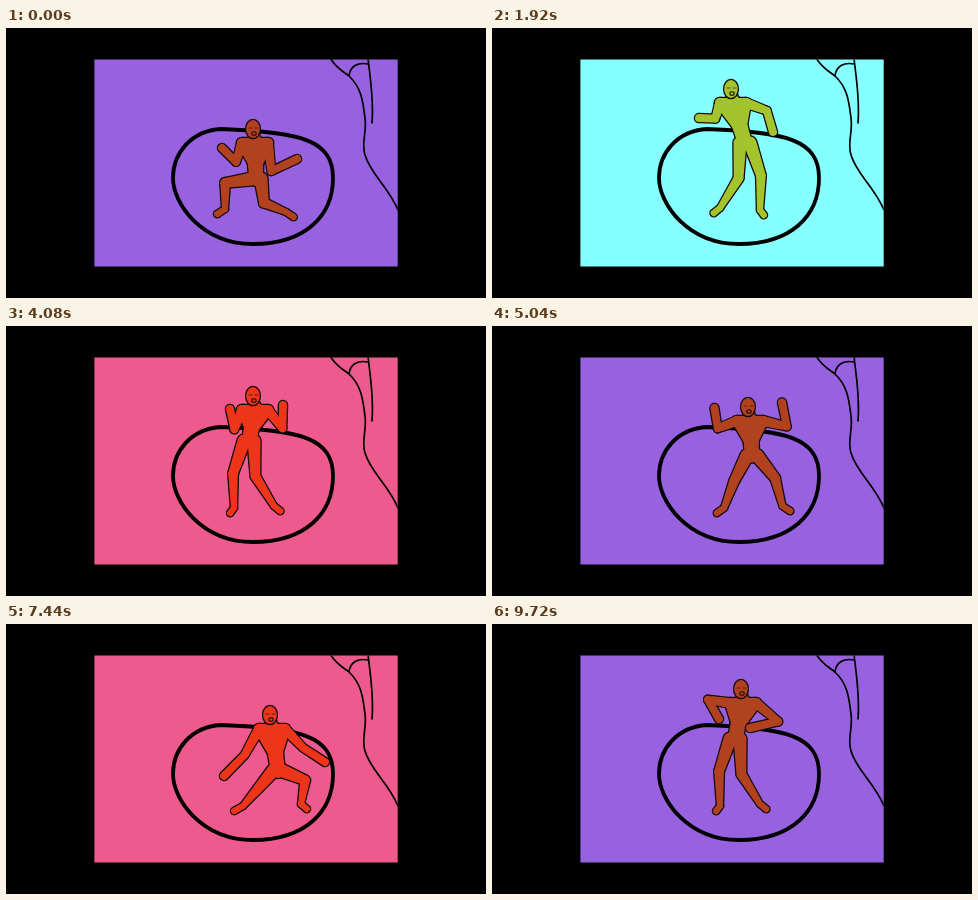
An HTML page with a canvas that plays this animation: 480 by 270 pixels, repeating every 9.84 s.

```html
<!DOCTYPE html>
<html lang="en">
<head>
<meta charset="utf-8">
<title>Dancer</title>
<style>
  html, body { margin: 0; width: 100%; height: 100%; overflow: hidden; background: #000; }
  canvas { display: block; width: 480px; height: 270px; filter: blur(.5px); }
</style>
</head>
<body>
<canvas id="stage" width="480" height="270"></canvas>
<script>
const ctx = document.getElementById('stage').getContext('2d');
const STEP = 120, STEPS = 82, BEAT = 4, INK = '#140a10';

// Backdrop and skin, in the order they flash
const palettes = [
  ['#9761e0', '#b2421f'],
  ['#85ffff', '#a3c42d'],
  ['#ee5a8e', '#ec3519'],
  ['#f0fe90', '#f4a72a']
];

// Legs: hips, left foot, right foot, bend of each knee
const squat  = [250, 151, 219, 181, 280, 184, -17, -12];
const lean   = [253, 115, 228, 180, 268, 182, 9, 6];
const lunge  = [277, 144, 236, 182, 313, 180, 3, 21];
const stride = [272, 147, 237, 182, 295, 180, 0, 15];
const mirror = ([hx, hy, lx, ly, rx, ry, bl, br], axis = 248) =>
  [2 * axis - hx, hy, 2 * axis - rx, ry, 2 * axis - lx, ly, -br, -bl];

// Upper body: head, left hand, right hand, bend of each elbow
const keys = [
  { at: 0,  body: [247, 101, 216, 120, 291, 131, 17, -23], legs: squat },
  { at: 16, body: [239, 61, 207, 90, 281, 104, 10, 10],    legs: lean },
  { at: 34, body: [247, 70, 224, 83, 277, 79, 20, -22],    legs: mirror(lean) },
  { at: 50, body: [265, 92, 221, 81, 303, 74, 12, -19],    legs: lunge },
  { at: 62, body: [264, 91, 218, 152, 319, 138, 4, -3],    legs: stride },
  { at: 70, body: [238, 59, 254, 91, 277, 103, -13, 9],    legs: lean },
  { at: 81, body: [249, 65, 227, 95, 258, 104, -20, 26],   legs: mirror(lean) }
];

const loop = new Path2D(`M215 101 C185 103 167 125 167 150 S195 216 247 216
  S327 188 327 150 S295 104 215 101Z`);
const lines = new Path2D(`M324 30 C331 41 338 44 343 48 C356 60 357 75 359 90
  C361 105 355 115 359 127 C365 147 382 158 392 182
  M343 48 C344 38 352 34 362 36 M362 30 C364 50 368 70 366 95`);

const lerp = (a, b, k) => a.map((v, i) => v + (b[i] - v) * k);
const add = ([x, y], dx, dy) => [x + dx, y + dy];

// Ease from key to key, swaying on the beat in between
function poseAt(step) {
  const i = keys.findLastIndex(k => k.at <= step);
  const from = keys[i], to = keys[i + 1] || { ...keys[0], at: STEPS };
  const span = to.at - from.at, u = (step - from.at) / span;
  const ease = u * u * (3 - 2 * u);
  const sway = Math.sin(Math.PI * Math.round(span / BEAT) * u);
  const [hx, hy, lx, ly, rx, ry, elbowL, elbowR] = lerp(from.body, to.body, ease);
  const [px, py, flx, fly, frx, fry, kneeL, kneeR] = lerp(from.legs, to.legs, ease);
  return {
    head: [hx + 5 * sway, hy], hips: [px - 4 * sway, py],
    hands: [[lx, ly + 8 * sway], [rx, ry - 8 * sway]], elbows: [elbowL, elbowR],
    feet: [[flx, fly], [frx, fry]], knees: [kneeL, kneeR]
  };
}

// Joint between two points, pushed sideways by the bend
function joint(p, q, bend) {
  const dx = q[0] - p[0], dy = q[1] - p[1], k = bend / (Math.hypot(dx, dy) || 1);
  return add(lerp(p, q, .5), dy * k, -dx * k);
}

// Tapered limb between two round joints
function limb(p, q, r, s) {
  const dx = q[0] - p[0], dy = q[1] - p[1];
  const a = Math.atan2(dy, dx);
  const b = Math.acos(Math.max(-1, Math.min(1, (r - s) / (Math.hypot(dx, dy) || 1))));
  const path = new Path2D();
  path.arc(...p, r, a + b, a - b + 2 * Math.PI);
  path.arc(...q, s, a - b, a + b);
  path.closePath();
  return path;
}

function oval(x, y, rx, ry) {
  const path = new Path2D();
  path.ellipse(x, y, rx, ry, 0, 0, 2 * Math.PI);
  return path;
}

// Shapes merge into one silhouette with a single outline
function silhouette(shapes, skin) {
  ctx.strokeStyle = INK;
  ctx.lineWidth = 2.6;
  shapes.forEach(s => ctx.stroke(s));
  ctx.fillStyle = skin;
  shapes.forEach(s => ctx.fill(s));
}

function dancer(step, skin) {
  const { head, hips, hands, elbows, feet, knees } = poseAt(step);
  const chest = add(head, 2, 14), waist = lerp(chest, hips, .6);
  const torso = [limb(head, chest, 4.5, 6), limb(chest, waist, 8, 7.5), limb(waist, hips, 7.5, 7)];
  const legs = [], upperArms = [], forearms = [];

  [-1, 1].forEach((side, i) => {
    const shoulder = add(chest, 13 * side, 0), hip = add(hips, 5 * side, 0);
    const elbow = joint(shoulder, hands[i], elbows[i]);
    const knee = joint(hip, feet[i], knees[i]);
    const toe = add(feet[i], (feet[i][0] - hips[0]) * .25, 5);
    torso.push(limb(chest, shoulder, 5, 5), limb(shoulder, waist, 5, 6.5));
    legs.push(limb(hip, knee, 6.5, 4.8), limb(knee, feet[i], 4.8, 3), limb(feet[i], toe, 3, 3.2));
    upperArms.push(limb(shoulder, elbow, 4.8, 3.8));
    forearms.push(limb(elbow, hands[i], 3.8, 4));
  });

  silhouette([...legs, ...torso, ...upperArms], skin);
  silhouette(forearms, skin);
  upperArms.forEach(a => ctx.fill(a));

  const [x, y] = head;
  silhouette([oval(x, y, 6.8, 9)], skin);
  ctx.lineWidth = 1.1;
  ctx.stroke(oval(x + 1, y + 4.5, 2.2, 1.8));
  ctx.lineWidth = .6;
  ctx.stroke(new Path2D(`M${x - 4} ${y - 1}h3m3 0h3`));
}

function draw(now) {
  const step = Math.floor(now / STEP) % STEPS;
  const [backdrop, skin] = palettes[Math.floor((step + 3) % 14 / 3.5)];
  ctx.fillStyle = '#000';
  ctx.fillRect(0, 0, 480, 270);
  ctx.save();
  ctx.beginPath();
  ctx.rect(88.4, 31.4, 303.3, 207.1);
  ctx.clip();
  ctx.fillStyle = backdrop;
  ctx.fillRect(88, 31, 304, 208);
  ctx.lineJoin = ctx.lineCap = 'round';
  ctx.strokeStyle = '#000';
  ctx.lineWidth = 1.7;
  ctx.stroke(lines);
  ctx.lineWidth = 3.8;
  ctx.stroke(loop);
  dancer(step, skin);
  ctx.restore();
}

const start = performance.now();
function tick() {
  draw(performance.now() - start);
  requestAnimationFrame(tick);
}
tick();
</script>
</body>
</html>
```
